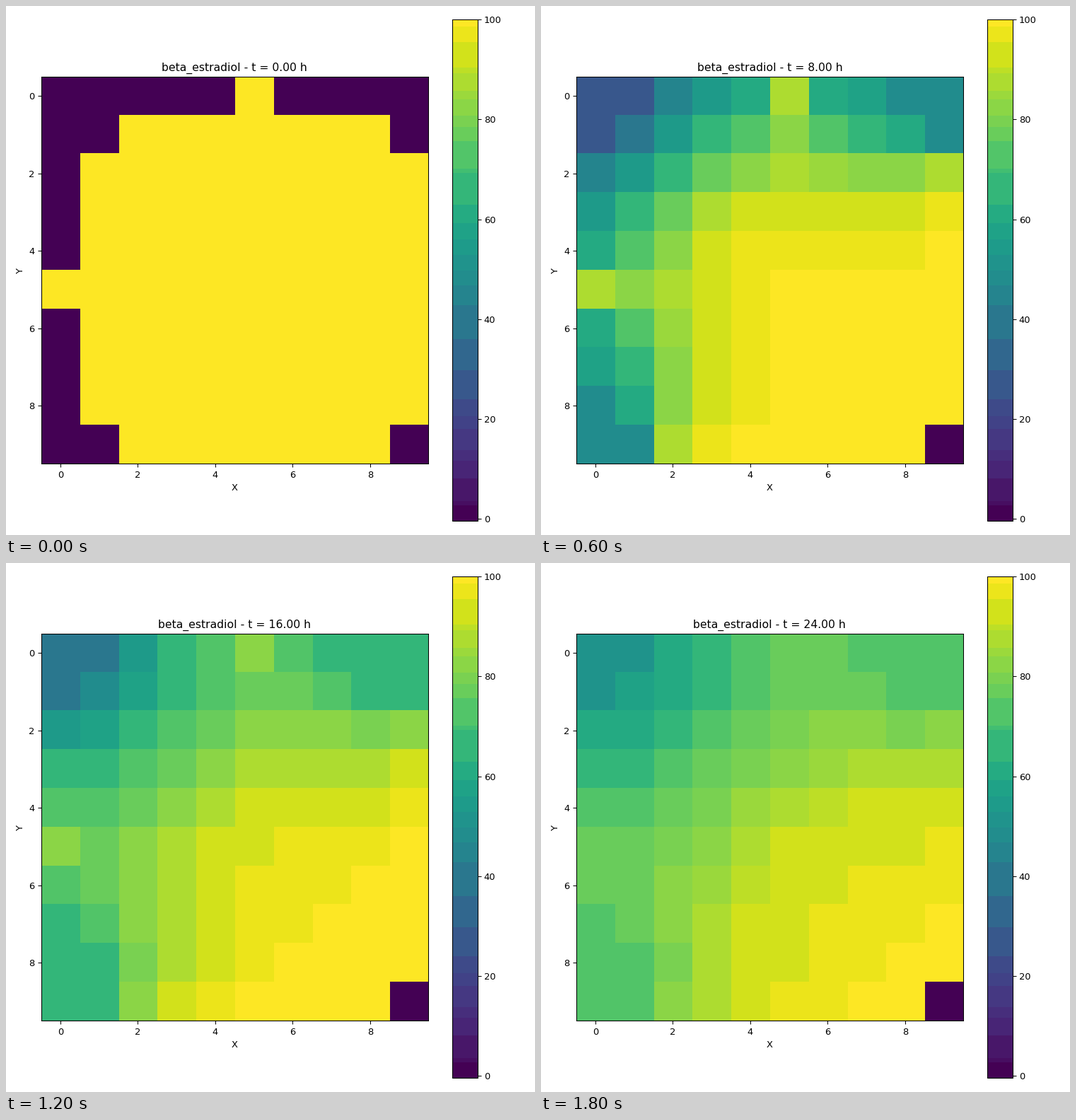
These frames come from a looping animation (748 px wide and 748 px high, 2 s). A matplotlib script:

```python
import matplotlib.pyplot as plt
import numpy as np
from matplotlib.animation import FuncAnimation
from matplotlib.colors import ListedColormap

SIZE, INCHES = 748, 8
N, FRAMES, HOURS = 10, 10, 24.0
RATE = 0.21      # exchange between neighbouring cells, per hour
SUBSTEPS = 100   # solver steps between two frames
VMIN, VMAX = -0.4, 100.0

# Upper limits of the colour bands
BANDS = [2.7, 3.6, 8.1, 11.6, 13.8, 18, 20.6, 24, 29.8, 36, 42.8, 46.8,
         49.7, 52.8, 56, 59.2, 63, 69.3, 70.2, 75.6, 78.6, 80.8, 84.1,
         85.7, 89.4, 90.4, 95.5, 98.6]


def banded_viridis():
    edges = np.array([VMIN, *BANDS, VMAX])
    mids = (edges[:-1] + edges[1:]) / 2
    mids[0], mids[-1] = VMIN, VMAX
    levels = np.linspace(VMIN, VMAX, 1024)
    picked = mids[np.digitize(levels, BANDS)]
    return ListedColormap(plt.get_cmap("viridis")((picked - VMIN) / (VMAX - VMIN)))


def diffuse(u, dt):
    """One step; border cells only exchange with their inner neighbour."""
    down = np.diff(u[:, 1:-1], axis=0) * RATE * dt
    right = np.diff(u[1:-1], axis=1) * RATE * dt
    u[:-1, 1:-1] += down
    u[1:, 1:-1] -= down
    u[1:-1, :-1] += right
    u[1:-1, 1:] -= right


def simulate():
    y, x = np.mgrid[:N, :N]
    u = np.where((x - 5) ** 2 + (y - 5) ** 2 <= 25, 100.0, 0.0)
    states = [u.copy()]
    for _ in range(FRAMES - 1):
        for _ in range(SUBSTEPS):
            diffuse(u, HOURS / (FRAMES - 1) / SUBSTEPS)
        # three corners follow their neighbour, the last one stays empty
        u[0, 0], u[0, -1], u[-1, 0] = u[0, 1], u[0, -2], u[-2, 0]
        states.append(u.copy())
    return states


def draw(i):
    image.set_data(states[i])
    title.set_text(f"beta_estradiol - t = {i * HOURS / (FRAMES - 1):.2f} h")
    return image, title


states = simulate()
fig, ax = plt.subplots(figsize=(INCHES, INCHES), dpi=SIZE / INCHES)
image = ax.imshow(states[0], cmap=banded_viridis(), vmin=VMIN, vmax=VMAX,
                  interpolation="nearest")
ax.set_xlabel("X")
ax.set_ylabel("Y")
title = ax.set_title("")
fig.colorbar(image, ax=ax, ticks=range(0, 101, 20))
draw(0)
fig.tight_layout()

anim = FuncAnimation(fig, draw, frames=FRAMES, interval=200,
                     repeat=True, repeat_delay=0)
plt.show()
```
